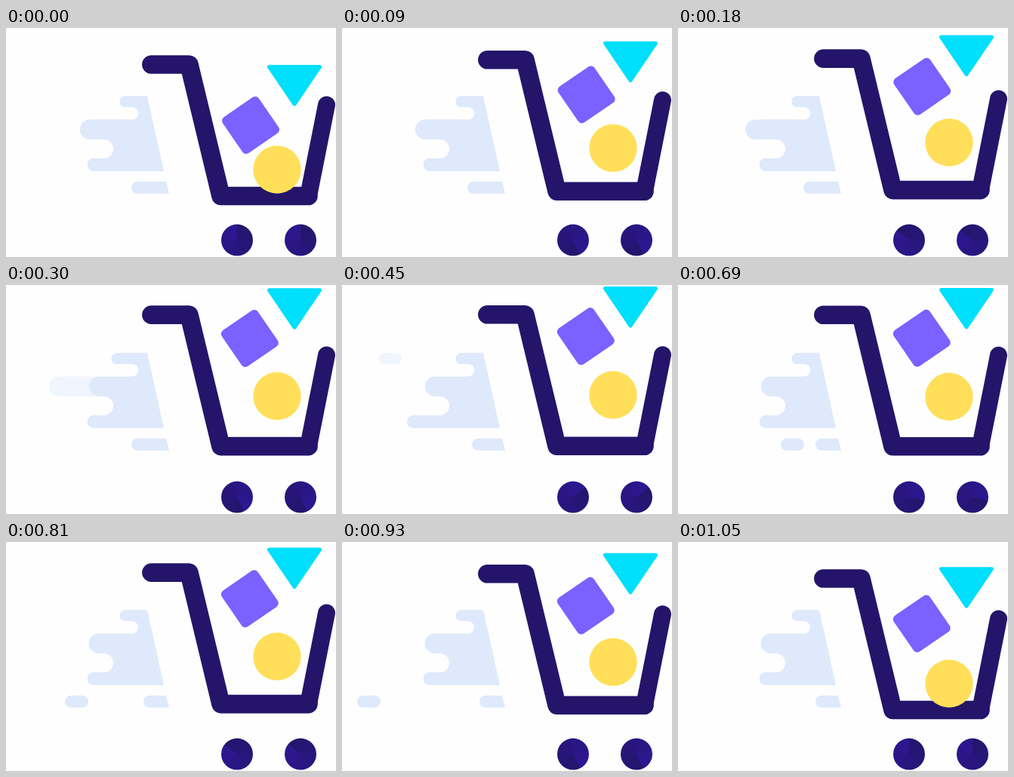
These frames come from a looping animation (437 px wide and 304 px high, 1080 ms). An HTML page with a canvas:

```html
<!DOCTYPE html>
<html lang="en">
<head>
<meta charset="utf-8">
<title>Shopping cart</title>
<style>
  html, body { margin: 0; width: 100%; height: 100%; overflow: hidden; background: #fefefe; }
  canvas { display: block; }
</style>
</head>
<body>
<canvas id="stage" width="437" height="304"></canvas>
<script>
const ctx = document.getElementById('stage').getContext('2d');
const LOOP = 1080, STEP = 30, SPIN = 1050;
const NAVY = '#24156b', INDIGO = '#2d1792', MIST = '#dfe9fc';
const clamp = v => Math.max(0, Math.min(1, v));

// Cubic bezier (.6, 0, 1, .3): slow start, abrupt end.
function ease(x) {
  let lo = 0, hi = 1;
  for (let i = 0; i < 24; i++) {
    const s = (lo + hi) / 2, r = 1 - s;
    if (1.8 * s * r * r + 3 * s * s * r + s ** 3 < x) lo = s; else hi = s;
  }
  return 0.9 * lo * lo * (1 - lo) + lo ** 3;
}

// Height of a toss, 0 on the ground and 1 at the peak.
function toss(t, peak, end) {
  return t < peak ? 1 - ease(1 - t / peak) : 1 - ease(clamp((t - peak) / (end - peak)));
}

function pill(x, y, w, h, alpha = 1) {
  if (alpha <= 0) return;
  ctx.globalAlpha = alpha;
  ctx.fillStyle = MIST;
  ctx.beginPath();
  ctx.roundRect(x, y, w, h, h / 2);
  ctx.fill();
  ctx.globalAlpha = 1;
}

const cloud = new Path2D('M187 90.3H158a7.4 7.4 0 0 0 0 14.8H167a8.2 8.2 0 0 1 0 16.4H123' +
  'a13.2 13.2 0 0 0 0 26.4H129.5a12.6 12.6 0 0 1 0 25.2H116.2a8.4 8.4 0 0 0 0 16.8H209z');
const frame = new Path2D('M192.4 48.5H242.5L284.5 223H400.5');
const arm = new Path2D('M400.5 223L424.5 102');
const wedge = new Path2D('M348.5 51.5H415.5L382 101z');

function drawStreaks(t) {
  const drift = start => 11 * Math.max(0, (t - start) / 150) ** 3.2;
  const fade = (start, time) => clamp(1 - (t - start) / time);
  pill(150.5 - drift(150), 90.3, 29.5, 14.8, fade(360, 150));
  pill(98 - 41 * (t / 300) ** 3, 121.5, 70, 26.4, fade(200, 190));
  pill(107.8 - drift(264), 173.1, 35, 16.8, fade(474, 150));
  ctx.fillStyle = MIST;
  ctx.fill(cloud);

  const left = 166 + 16 * clamp((t - 400) / 130);
  ctx.beginPath();
  ctx.moveTo(212, 203.8);
  ctx.lineTo(216, 219.8);
  ctx.lineTo(left + 8, 219.8);
  ctx.arc(left + 8, 211.8, 8, Math.PI / 2, Math.PI * 1.5);
  ctx.fill();
  if (t > 590) pill(136 - 0.483 * (t - 690), 203.8, 31, 16);
}

function drawCart(lift) {
  ctx.save();
  ctx.translate(0, -9.2 * lift);
  ctx.strokeStyle = NAVY;
  ctx.lineCap = ctx.lineJoin = 'round';
  ctx.lineWidth = 24.6;
  ctx.stroke(frame);
  ctx.lineWidth = 23;
  ctx.stroke(arm);
  ctx.restore();
}

function drawGoods(t, lift) {
  const high = toss(t, 480, 1072);

  ctx.save();
  ctx.translate(0, -47 * high);
  ctx.fillStyle = ctx.strokeStyle = '#00dffb';
  ctx.lineJoin = 'round';
  ctx.lineWidth = 5;
  ctx.fill(wedge);
  ctx.stroke(wedge);
  ctx.restore();

  ctx.save();
  ctx.translate(324 - 1.2 * clamp(t / 300), 129 - 61 * high);
  ctx.rotate(-34.5 * Math.PI / 180);
  ctx.fillStyle = '#7b61ff';
  ctx.beginPath();
  ctx.roundRect(-29, -29, 58, 58, 6);
  ctx.fill();
  ctx.restore();

  ctx.fillStyle = '#ffdf59';
  ctx.beginPath();
  ctx.arc(359, 188 - 42 * lift, 31.7, 0, Math.PI * 2);
  ctx.fill();
}

function drawWheel(x, y, turn) {
  const shade = ctx.createConicGradient((turn - 0.25) * Math.PI * 2, x, y);
  shade.addColorStop(0, NAVY);
  shade.addColorStop(1, INDIGO);
  ctx.fillStyle = shade;
  ctx.beginPath();
  ctx.arc(x, y, 21, 0, Math.PI * 2);
  ctx.fill();
}

function draw(t) {
  const lift = toss(t, 450, 1050);
  const turn = 5 * t / SPIN % 1;
  ctx.fillStyle = '#fefefe';
  ctx.fillRect(0, 0, 437, 304);
  drawStreaks(t);
  drawCart(lift);
  drawGoods(t, lift);
  drawWheel(306, 281.6, turn);
  drawWheel(390, 281.6, turn);
}

const begin = performance.now();
function tick() {
  const t = (performance.now() - begin) % LOOP;
  draw(Math.floor(t / STEP) * STEP);
  requestAnimationFrame(tick);
}
tick();
</script>
</body>
</html>
```
